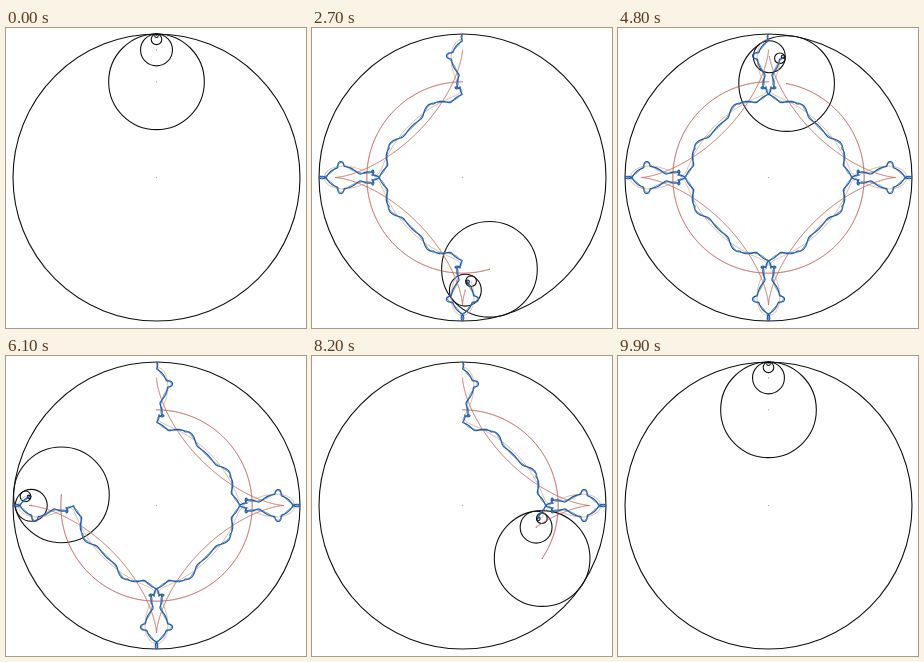
These frames come from a looping animation (300 px wide and 300 px high, 10 s). An HTML page with a canvas:

```html
<!DOCTYPE html>
<html lang="en">
<head>
<meta charset="utf-8">
<title>Nested rolling circles</title>
<style>
  html, body { margin: 0; width: 100%; height: 100%; overflow: hidden; background: #fff; }
  canvas { display: block; width: 300px; height: 300px; }
</style>
</head>
<body>
<canvas id="stage"></canvas>
<script>
const canvas = document.getElementById('stage');
const ctx = canvas.getContext('2d');
const scale = window.devicePixelRatio || 1;
canvas.width = canvas.height = 300 * scale;
ctx.scale(scale, scale);
ctx.lineJoin = ctx.lineCap = 'round';

const TAU = Math.PI * 2;
const STEPS = 100;
const STEP_MS = 100;
const CX = 150.5, CY = 149.5, R = 143.5;
const LEVELS = 6;

// Trail of each nested centre, from the first rolling circle inwards.
const trails = [
  { level: 1, color: '#bd4a42', width: 1 },
  { level: 2, color: '#c4685a', width: 1 },
  { level: 3, color: '#d3a184', width: 0.8 },
  { level: 4, color: '#4f86c4', width: 1 },
  { level: 5, color: '#1f5ca8', width: 1.2 }
];

const radius = level => R / 3 ** level;

// Each circle is a third of its parent and turns three times as fast, the other way.
function centre(level, angle) {
  let x = CX, y = CY;
  for (let n = 1; n <= level; n++) {
    const arm = radius(n - 1) - radius(n);
    const a = (-3) ** (n - 1) * angle;
    x -= arm * Math.sin(a);
    y -= arm * Math.cos(a);
  }
  return [x, y];
}

function drawTrail({ level, color, width }, from, to) {
  const count = Math.ceil((to - from) / TAU * 1800);
  if (count < 1) return;
  ctx.beginPath();
  for (let i = 0; i <= count; i++) {
    ctx.lineTo(...centre(level, from + (to - from) * i / count));
  }
  ctx.strokeStyle = color;
  ctx.lineWidth = width;
  ctx.stroke();
}

function drawCircle(level, angle) {
  const [x, y] = centre(level, angle);
  ctx.beginPath();
  ctx.arc(x, y, radius(level), 0, TAU);
  ctx.strokeStyle = '#111';
  ctx.lineWidth = 1.1;
  ctx.stroke();
  if (level < 3) {
    ctx.beginPath();
    ctx.arc(x, y, 0.6, 0, TAU);
    ctx.fillStyle = '#999';
    ctx.fill();
  }
}

function draw(step) {
  const angle = 2 * TAU * step / (STEPS - 1);
  // The first turn draws the trails, the second wipes them from their start.
  const from = Math.max(0, angle - TAU);
  const to = Math.min(angle, TAU);

  ctx.fillStyle = '#fff';
  ctx.fillRect(0, 0, 300, 300);
  for (let n = 0; n < LEVELS; n++) drawCircle(n, angle);
  for (const trail of trails) drawTrail(trail, from, to);
}

const start = performance.now();
let shown = -1;
function tick() {
  const step = Math.floor((performance.now() - start) / STEP_MS) % STEPS;
  if (step !== shown) draw(shown = step);
  requestAnimationFrame(tick);
}
tick();
</script>
</body>
</html>
```
